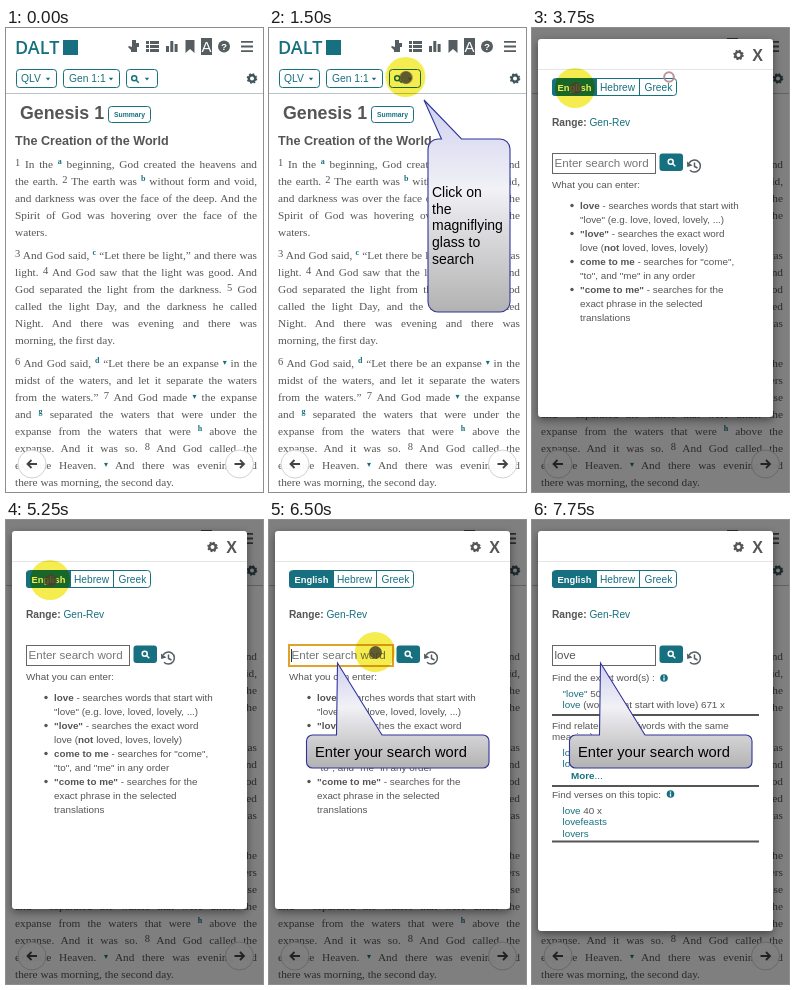
Recreate the animation shown at these times as an HTML page. Size 257x464 px, loop 8 s.

```html
<!DOCTYPE html>
<html lang="en">
<head>
<meta charset="utf-8">
<title>Search guide</title>
<style>
html, body { margin: 0; width: 100%; height: 100%; overflow: hidden; background: #fff; }
#stage { position: relative; width: 257px; height: 464px; overflow: hidden; background: #fff; isolation: isolate; }
svg, .dim, .modal, .spot, .dot { position: absolute; left: 0; top: 0; }
svg { display: block; width: 257px; height: 464px; }
text { font: 9.85px "Liberation Sans", Arial, sans-serif; fill: #555; }
.b { font-weight: bold; }
.teal, text.teal, tspan.teal { fill: #17707f; }
.btn { fill: none; stroke: #17707f; stroke-width: 1; }
.line { fill: none; stroke: #555d60; }

.verse { position: absolute; left: 9px; width: 242px; font: 11.3px/17px "Liberation Serif", "Times New Roman", serif; color: #555; }
.verse div { height: 17px; text-align-last: justify; }
.verse div:last-child { text-align-last: left; }
.verse i, .verse b { font-style: normal; line-height: 0; position: relative; }
.verse i { font-size: 10.5px; top: -2px; }
.verse b { font-size: 8px; top: -4px; color: #17707f; }
.verse u { font: 8px/0 "DejaVu Sans", sans-serif; text-decoration: none; color: #17707f; position: relative; top: -2px; }

.dim { width: 257px; height: 464px; background: rgba(0, 0, 0, .5); }
.modal { left: 6px; top: 11px; width: 235px; height: 378px; border-radius: 3px; background: #fff; box-shadow: 0 3px 8px rgba(0, 0, 0, .45); }
.spot { width: 40px; height: 40px; margin: -20px; border-radius: 50%; mix-blend-mode: multiply;
  background: radial-gradient(circle, #f5ec50 85%, #f8f29a 100%); }
.dot { width: 13px; height: 13px; margin: -6.5px; border-radius: 50%; background: radial-gradient(circle, rgba(70, 66, 42, .85) 60%, rgba(90, 86, 50, .5)); }

/* Constant easing: each keyframe holds until the next one */
.tip1, .tip2, .dim, .modal, .dialog, .spot, .dot, .ring, .focus, .caret, .hint, .k1, .k2, .k3, .help, .found {
  animation: 8s infinite;
  animation-timing-function: linear(0 0%, 0 100%);
}
.tip1 { animation-name: tip1; }
.tip2 { animation-name: tip2; }
.dim, .dialog { animation-name: open; }
.modal { animation-name: open, grow; }
.spot, .dot { animation-name: move; }
.ring { animation-name: ring; }
.focus { animation-name: focus; }
.caret { animation-name: caret; }
.hint { animation-name: hint; }
.k1 { animation-name: k1; }
.k2 { animation-name: k2; }
.k3, .found { animation-name: late; }
.help { animation-name: early; }

@keyframes tip1 { 0%, 43.75%, 100% { visibility: hidden } 3.125% { visibility: visible } }
@keyframes tip2 { 0% { visibility: hidden } 68.75%, 100% { visibility: visible } }
@keyframes open { 0% { visibility: hidden } 46.875%, 100% { visibility: visible } }
@keyframes grow { 0% { height: 378px } 96.875%, 100% { height: 400px } }
@keyframes ring { 0%, 50%, 100% { visibility: hidden } 43.75% { visibility: visible } }
@keyframes focus { 0%, 96.875%, 100% { visibility: hidden } 71.875% { visibility: visible } }
@keyframes caret { 0%, 75%, 87.5%, 100% { visibility: hidden } 71.875%, 81.25% { visibility: visible } }
@keyframes hint { 0%, 87.5%, 100% { visibility: hidden } 46.875% { visibility: visible } }
@keyframes k1 { 0%, 93.75%, 100% { visibility: hidden } 87.5% { visibility: visible } }
@keyframes k2 { 0%, 96.875%, 100% { visibility: hidden } 93.75% { visibility: visible } }
@keyframes late { 0% { visibility: hidden } 96.875%, 100% { visibility: visible } }
@keyframes early { 0%, 96.875%, 100% { visibility: hidden } 46.875% { visibility: visible } }
@keyframes move {
  0% { opacity: 0; transform: translate(221.5px, 128px) }
  6.25% { opacity: 1; transform: translate(221.5px, 128px) }
  9.375% { opacity: 1; transform: translate(204px, 109px) }
  12.5% { opacity: 1; transform: translate(170px, 75px) }
  15.625% { opacity: 1; transform: translate(146px, 56px) }
  18.75% { opacity: 1; transform: translate(136.5px, 49px) }
  46.875% { opacity: 1; transform: translate(43px, 60px) }
  53.125% { opacity: 1; transform: translate(43.5px, 60px) }
  65.625% { opacity: 1; transform: translate(44px, 60px) }
  71.875% { opacity: 1; transform: translate(106px, 132px) }
  96.875%, 100% { opacity: 0; transform: translate(106px, 132px) }
}
</style>
</head>
<body>
<div id="stage">
  <svg viewBox="0 0 257 464">
    <defs>
      <g id="gear">
        <circle r="3.2" fill="none" stroke-width="2.4" stroke="currentColor"/>
        <circle r="4.5" fill="none" stroke-width="1.6" stroke="currentColor" stroke-dasharray="1.77 1.77"/>
      </g>
      <g id="lens" fill="none" stroke="currentColor" stroke-width="1.5">
        <circle cx="-.8" cy="-.8" r="2.5"/><path d="M1.2 1.2L3.8 3.8"/>
      </g>
      <path id="down" d="M-2.2-1.2H2.2L0 1.6Z" fill="#17707f"/>
      <linearGradient id="shade" x1="0" y1="0" x2="0" y2="1">
        <stop offset="0" stop-color="#cfd0f0"/><stop offset=".42" stop-color="#f1f1f6"/><stop offset="1" stop-color="#b2b2b2"/>
      </linearGradient>
    </defs>

    <text class="teal" x="9" y="26" style="font:600 18px 'Open Sans',sans-serif">DALT</text>
    <rect class="teal" x="57" y="12" width="15" height="15"/>

    <g fill="#555d60">
      <path d="M126 12h4v3h3v4h-2v5h-6v-2l-3-3 1-1 3 1z"/>
      <path d="M140 13h3v3h-3zm4 0h9v3h-9zm-4 4h3v3h-3zm4 0h9v3h-9zm-4 4h3v3h-3zm4 0h9v3h-9z"/>
      <path d="M160 18h3v6h-3zm4.3-5h3v11h-3zm4.3 3h3v8h-3z"/>
      <path d="M179.5 12h9v13l-4.5-4-4.5 4z"/>
      <rect x="195" y="10" width="11" height="17"/>
      <circle cx="218" cy="18.5" r="6"/>
      <path d="M235 13h12v1.8h-12zm0 4.6h12v1.8h-12zm0 4.6h12v1.8h-12z"/>
    </g>
    <text x="200.5" y="24" text-anchor="middle" style="font-size:15px;fill:#fff">A</text>
    <text class="b" x="218" y="22" text-anchor="middle" style="fill:#fff">?</text>

    <g class="btn">
      <rect x="10.5" y="41.5" width="40" height="18" rx="3"/>
      <rect x="57.5" y="41.5" width="56" height="18" rx="3"/>
      <rect x="120.5" y="41.5" width="31" height="18" rx="3"/>
      <rect x="102.5" y="78.5" width="42" height="16" rx="3"/>
    </g>
    <text class="teal" x="15" y="54" style="font-size:10.3px">QLV</text>
    <text class="teal" x="63" y="54" style="font-size:10.3px">Gen 1:1</text>
    <use href="#down" x="42" y="51"/><use href="#down" x="105" y="51"/><use href="#down" x="141" y="51"/>
    <use href="#lens" x="129" y="51" color="#17707f"/>
    <use href="#gear" x="246" y="50.5" color="#3f555b"/>
    <path d="M0 65.5H257" stroke="#b9c5c8"/>

    <text class="b" x="14" y="91" style="font-size:17.8px">Genesis 1</text>
    <text class="b teal" x="108" y="89" style="font-size:6.8px">Summary</text>
    <text class="b" x="9" y="117" style="font-size:12.6px">The Creation of the World</text>
  </svg>

  <div class="verse" style="top:127.5px">
    <div><i>1</i> In the <b>a</b> beginning, God created the heavens and</div>
    <div>the earth. <i>2</i> The earth was <b>b</b> without form and void,</div>
    <div>and darkness was over the face of the deep. And the</div>
    <div>Spirit of God was hovering over the face of the</div>
    <div>waters.</div>
  </div>
  <div class="verse" style="top:218.5px">
    <div><i>3</i> And God said, <b>c</b> “Let there be light,” and there was</div>
    <div>light. <i>4</i> And God saw that the light was good. And</div>
    <div>God separated the light from the darkness. <i>5</i> God</div>
    <div>called the light Day, and the darkness he called</div>
    <div>Night. And there was evening and there was</div>
    <div>morning, the first day.</div>
  </div>
  <div class="verse" style="top:326.5px">
    <div><i>6</i> And God said, <b>d</b> “Let there be an expanse <u>▾</u> in the</div>
    <div>midst of the waters, and let it separate the waters</div>
    <div>from the waters.” <i>7</i> And God made <u>▾</u> the expanse</div>
    <div>and <b>g</b> separated the waters that were under the</div>
    <div>expanse from the waters that were <b>h</b> above the</div>
    <div>expanse. And it was so. <i>8</i> And God called the</div>
    <div>expanse Heaven. <u>▾</u> And there was evening and</div>
    <div>there was morning, the second day.</div>
  </div>

  <svg viewBox="0 0 257 464">
    <g fill="#fff" fill-opacity=".94" stroke="#d2d2d2">
      <circle cx="26" cy="436" r="14"/><circle cx="233.5" cy="436" r="14"/>
    </g>
    <path d="M31 436H21.5M25.5 432L21.5 436L25.5 440M228.5 436H238M234 432L238 436L234 440" fill="none" stroke="#444" stroke-width="1.8"/>
  </svg>

  <div class="dim"></div>
  <div class="modal"></div>

  <svg class="dialog" viewBox="0 0 257 464">
    <path d="M6 41.5H241" stroke="#e5e5e5"/>
    <use href="#gear" x="206.5" y="27" color="#555"/>
    <text class="b" x="225.5" y="33" text-anchor="middle" style="font-size:16px">X</text>

    <path d="M23 51H64V68H23a3 3 0 0 1-3-3V54a3 3 0 0 1 3-3z" class="teal"/>
    <rect class="btn" x="20.5" y="50.5" width="124" height="17" rx="3"/>
    <path class="btn" d="M64.5 51V68M107.5 51V68"/>
    <text class="b" x="25.5" y="62.5" style="fill:#fff;font-size:9.4px">English</text>
    <text class="teal" x="68" y="62.5" style="font-size:10.2px">Hebrew</text>
    <text class="teal" x="112.5" y="62.5" style="font-size:10.2px">Greek</text>
    <text x="20" y="97.5" style="font-size:10.2px"><tspan class="b">Range:</tspan> <tspan class="teal">Gen-Rev</tspan></text>

    <rect x="20.5" y="125.5" width="103" height="20" fill="#fff" stroke="#666"/>
    <rect class="focus" x="20" y="125" width="104" height="21" fill="none" stroke="#dfa22b" stroke-width="2"/>
    <g style="--size:11.6px">
      <text class="hint" x="22.5" y="139" style="font-size:var(--size);fill:#757575">Enter search word</text>
      <text class="k1" x="22.5" y="139" style="font-size:var(--size)">l</text>
      <text class="k2" x="22.5" y="139" style="font-size:var(--size)">lov</text>
      <text class="k3" x="22.5" y="139" style="font-size:var(--size)">love</text>
    </g>
    <rect class="caret" x="22" y="129" width="1" height="13" fill="#333"/>
    <rect class="teal" x="127.5" y="125.5" width="23.5" height="17.5" rx="3"/>
    <use href="#lens" x="139.5" y="134.5" color="#fff"/>
    <path class="line" d="M157.2 135A6 6 0 1 1 158 142.2M162.5 134.5V138.5L165.5 140" stroke-width="1.5"/>
    <path d="M155 133.5L160.5 137.5L155.2 139Z" fill="#555d60"/>

    <g class="help">
      <text x="20" y="159.5">What you can enter:</text>
      <g fill="#555">
        <circle cx="40" cy="177.5" r="1.7"/><circle cx="40" cy="205.5" r="1.7"/>
        <circle cx="40" cy="233.5" r="1.7"/><circle cx="40" cy="261.5" r="1.7"/>
      </g>
      <text>
        <tspan x="48" y="180.5" class="b">love</tspan> - searches words that start with
        <tspan x="48" y="194.5">"love" (e.g. love, loved, lovely, ...)</tspan>
        <tspan x="48" y="208.5" class="b">"love"</tspan> - searches the exact word
        <tspan x="48" y="222.5">love (</tspan><tspan class="b">not</tspan> loved, loves, lovely)
        <tspan x="48" y="236.5" class="b">come to me</tspan> - searches for "come",
        <tspan x="48" y="250.5">"to", and "me" in any order</tspan>
        <tspan x="48" y="264.5" class="b">"come to me"</tspan> - searches for the
        <tspan x="48" y="278.5">exact phrase in the selected</tspan>
        <tspan x="48" y="292.5">translations</tspan>
      </text>
    </g>

    <g class="found">
      <text x="20" y="161">Find the exact word(s) :</text>
      <text x="30.5" y="176.5"><tspan class="teal">"love"</tspan> 506 x</text>
      <text x="30.5" y="188"><tspan class="teal">love</tspan> (words that start with love) 671 x</text>
      <text x="20" y="208.5">Find related words (words with the same</text>
      <text x="20" y="220">meaning):</text>
      <text class="teal" x="30.5" y="236">loving</text>
      <text class="teal" x="30.5" y="247">loved</text>
      <text class="teal" x="39" y="258.5"><tspan class="b">More</tspan>...</text>
      <text x="20" y="277.5">Find verses on this topic:</text>
      <text x="30.5" y="294"><tspan class="teal">love</tspan> 40 x</text>
      <text class="teal" x="30.5" y="305">lovefeasts</text>
      <text class="teal" x="30.5" y="316.5">lovers</text>
      <path d="M20 195H227M20 266H227M20 321.5H227" stroke="#555" stroke-width="2"/>
      <g class="teal"><circle cx="132" cy="158" r="3.8"/><circle cx="138.5" cy="274" r="3.8"/></g>
      <path d="M132 155.5v1.2m0 .8v3M138.5 271.5v1.2m0 .8v3" stroke="#fff" stroke-width="1.3"/>
    </g>
  </svg>

  <div class="spot"></div>
  <div class="dot"></div>

  <svg viewBox="0 0 257 464">
    <circle class="ring" cx="137" cy="49" r="4.8" fill="none" stroke="#b5808a" stroke-opacity=".85" stroke-width="2"/>
    <g stroke="#30349a" stroke-width="1.1" fill="url(#shade)">
      <path class="tip1" d="M155 72L192.5 111H231a10 10 0 0 1 10 10V274a10 10 0 0 1-10 10H169a10 10 0 0 1-10-10V121a10 10 0 0 1 10-10H172.5Z"/>
      <path class="tip2" d="M68.5 143L113 215H214a6 6 0 0 1 6 6V242a6 6 0 0 1-6 6H43.5a6 6 0 0 1-6-6V221a6 6 0 0 1 6-6H67.5Z"/>
    </g>
    <text class="tip1" style="font-size:14px;fill:#000">
      <tspan x="163" y="169">Click on</tspan>
      <tspan x="163" y="185.7">the</tspan>
      <tspan x="163" y="202.4">magniflying</tspan>
      <tspan x="163" y="219.1">glass to</tspan>
      <tspan x="163" y="235.8">search</tspan>
    </text>
    <text class="tip2" x="46" y="237" style="font-size:14.7px;fill:#000">Enter your search word</text>
  </svg>
</div>
</body>
</html>
```
